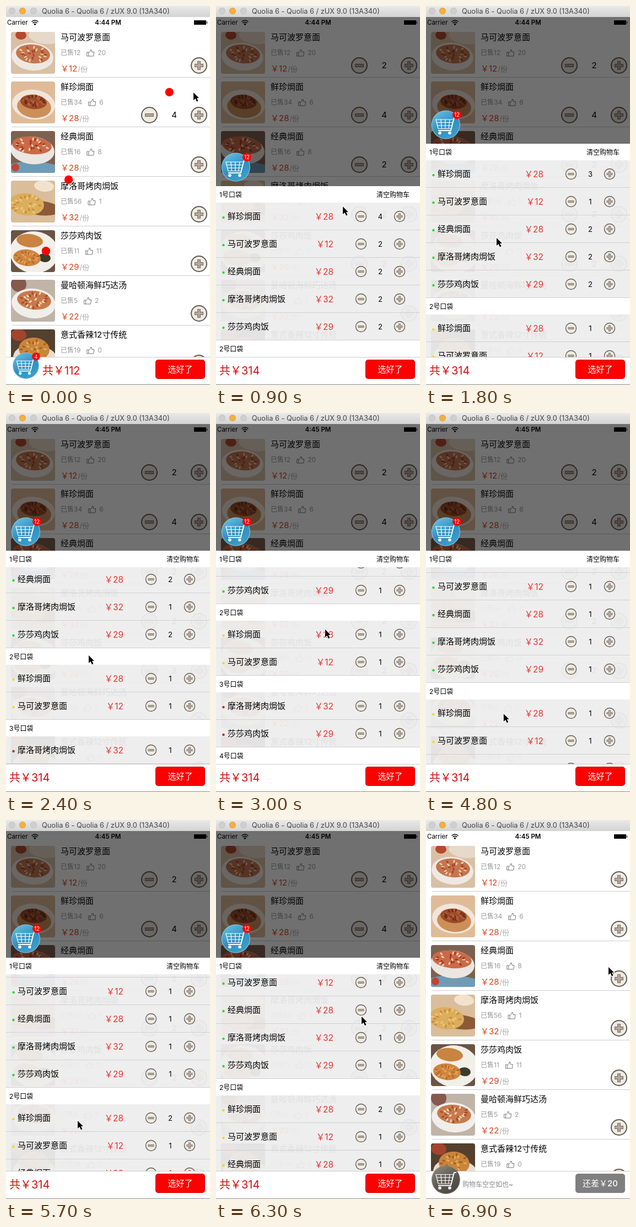
Recreate the animation shown at these times as an HTML page with a canvas. Size 370x688 px, loop 7200 ms.

```html
<!DOCTYPE html>
<html lang="zh-CN">
<head>
<meta charset="utf-8">
<title>购物车</title>
<style>
  html, body { margin: 0; width: 100%; height: 100%; overflow: hidden; background: #fff; }
  canvas { display: block; width: 370px; height: 688px; }
</style>
</head>
<body>
<canvas id="stage" width="370" height="688"></canvas>
<script>
const canvas = document.getElementById('stage');
const ctx = canvas.getContext('2d');
const FONT = 'Inter, "Noto Sans CJK SC", "Noto Sans CJK", sans-serif';
const STEP = 300, STEPS = 24, OPEN = 3, CLEARED = 23;
const BAR_TOP = 637, MAX_PANEL = 387;

// Photo shapes: [x, y, rx, ry, colour]; the last one is sprinkled with specks.
const dishes = [
  { name: '马可波罗意面', sold: 12, likes: 20, price: 12, back: '#d9bfa4', specks: ['#ecc9a4', '#a8482a'], shapes: [
    [18, 6, 10, 8, '#b5492f'], [62, 8, 30, 14, '#e6d9ca'], [39, 45, 38, 25, '#efe8e2'], [40, 40, 31, 17, '#c47650']] },
  { name: '鲜珍焗面', sold: 34, likes: 6, price: 28, back: '#e0bb98', specks: ['#b5623a', '#6e2d18'], shapes: [
    [41, 42, 39, 27, '#f1e5da'], [42, 46, 31, 20, '#cc8f58'], [41, 37, 24, 13, '#9c4a2a']] },
  { name: '经典焗面', sold: 16, likes: 8, price: 28, back: '#7d6150', specks: ['#f0d2a8', '#a83424'], shapes: [
    [50, 76, 60, 20, '#6f9cb5'], [8, 66, 7, 7, '#c04434'], [39, 35, 40, 25, '#ebe6e1'], [38, 26, 36, 16, '#c96a48']] },
  { name: '摩洛哥烤肉焗饭', sold: 56, likes: 1, price: 32, back: '#dabd9a', specks: ['#ecc780', '#c98c40'], shapes: [
    [60, 10, 18, 10, '#f0e3cd'], [54, 50, 36, 13, '#8c5a38'], [28, 43, 32, 20, '#dcae5c']] },
  { name: '莎莎鸡肉饭', sold: 11, likes: 11, price: 29, back: '#6a5444', specks: ['#e2a356', '#b8692a'], shapes: [
    [42, 40, 44, 38, '#f2eee8'], [34, 19, 24, 12, '#c88440'], [61, 50, 11, 8, '#3a3c2a'], [29, 50, 25, 15, '#cf853f']] },
  { name: '曼哈顿海鲜巧达汤', sold: 5, likes: 2, price: 22, back: '#c0b3a8', specks: ['#f0d5b0', '#a84a28'], shapes: [
    [14, 8, 14, 14, '#85594c'], [41, 43, 40, 27, '#f1eeea'], [42, 37, 31, 17, '#c77a4c']] },
  { name: '意式香辣12寸传统', sold: 19, likes: 0, price: 28, back: '#54402f', specks: ['#e6ab58', '#a85c20'], shapes: [
    [14, 10, 14, 11, '#a2452c'], [44, 52, 40, 24, '#e6ded0'], [42, 36, 28, 21, '#c8853c']] }
];

const pocketOrder = [1, 0, 2, 3, 4];
const ordered = [2, 4, 2, 2, 2, 0, 0];
const countsByStep = [[0, 4], [2, 4, 1], ordered];
// Portions carried out of the first pocket: [step, dish, pocket]
const moves = [[4, 1, 1], [5, 0, 1], [8, 3, 2], [9, 4, 2], [13, 2, 1], [17, 1, 1]];
const scrollByStep = [0, 0, 0, 0, 0, 0, 0, 53, 103, 183, 183, 183, 100, 35, 35, 35, 40, 44, 44, 44, 110, 60, 60, 0];
// Flying dots: [row, progress]
const dotsByStep = [[[1, .138], [1, .68], [1, .825]], [[2, .14], [0, .62], [0, .8]], [[4, .2], [4, .62], [3, .82]]];
const cursorKeys = [[0, 340, 157], [1, 342, 285], [2, 342, 460], [3, 230, 364], [6, 128, 421], [8, 150, 440],
  [10, 198, 393], [11, 190, 375], [14, 148, 546], [19, 130, 546], [22, 331, 262], [23, 331, 267]];

function text(str, x, y, size, color = '#000', align = 'left', weight = 400) {
  ctx.font = `${weight} ${size}px ${FONT}`;
  ctx.fillStyle = color;
  ctx.textAlign = align;
  ctx.fillText(str, x, y + size * .36);
  return x + ctx.measureText(str).width;
}
function rect(x, y, w, h, color) {
  ctx.fillStyle = color;
  ctx.fillRect(x, y, w, h);
}
function ellipse(x, y, rx, ry, color, tilt = 0) {
  ctx.beginPath();
  ctx.ellipse(x, y, rx, ry, tilt, 0, 7);
  ctx.fillStyle = color;
  ctx.fill();
}
const disc = (x, y, r, color) => ellipse(x, y, r, r, color);
function stroke(path, color, width) {
  ctx.strokeStyle = color;
  ctx.lineWidth = width;
  ctx.stroke(new Path2D(path));
}
function at(x, y, scale, draw) {
  ctx.save();
  ctx.translate(x, y);
  ctx.scale(scale, scale);
  draw();
  ctx.restore();
}
function clip(x, y, w, h, radius, draw) {
  ctx.save();
  ctx.beginPath();
  ctx.roundRect(x, y, w, h, radius);
  ctx.clip();
  draw();
  ctx.restore();
}
const noise = n => { const v = Math.sin(n * 127.1) * 43758.5; return v - Math.floor(v); };

function photo(dish, y) {
  at(9, y, 1, () => clip(0, 0, 80, 76, 4, () => {
    rect(0, 0, 80, 76, dish.back);
    dish.shapes.forEach(s => ellipse(...s, .1));
    const [x, cy, rx, ry] = dish.shapes[dish.shapes.length - 1];
    for (let i = 0; i < 26; i++) {
      const angle = i * 2.4, d = Math.sqrt(noise(i + dish.sold)) * .85;
      ellipse(x + Math.cos(angle) * rx * d, cy + Math.sin(angle) * ry * d, 3, 1.6, dish.specks[i % 2], angle);
    }
  }));
}

function roundButton(x, y, scale, plus) {
  at(x, y, scale, () => {
    disc(0, 0, 15, '#625b5a');
    disc(0, 0, 13, '#eeecdf');
    stroke(plus ? 'M-8 0H8M0-8V8' : 'M-8 0H8', '#7d7070', 6);
    stroke(plus ? 'M-7 0H7M0-7V7' : 'M-7 0H7', '#b9aaa4', 3.4);
  });
}

function listRow(dish, i, count) {
  const y = 40 + i * 90;
  photo(dish, y + 7);
  text(dish.name, 99, y + 17, 15);
  const x = text('已售' + dish.sold, 99, y + 45, 12, '#999') + 11;
  at(x, y + 39, 1, () => stroke('M.5 5H3.5V12H.5ZM3.5 6 7 3V.5H9L9.5 4.5H13.5L12.5 12H3.5', '#777', 1));
  text(dish.likes, x + 20, y + 45, 12, '#999');
  const end = text('￥' + dish.price, 99, y + 74, 15, '#d8431c');
  text('/份', end + 1, y + 74, 13, '#aaa');
  rect(11, y + 89, 359, 1, '#ccc');
  roundButton(350, y + 68, 1, true);
  if (count) {
    roundButton(260, y + 68, 1, false);
    text(count, 305, y + 68, 15, '#000', 'center');
  }
}

function statusBar(time) {
  text('Carrier', 2, 30, 11.5);
  stroke('M46.5 28.5Q52.5 23.5 58.5 28.5M48.5 31Q52.5 27.5 56.5 31', '#000', 1.6);
  disc(52.5, 33.2, 1.6, '#000');
  text(time, 185, 30, 11.5, '#000', 'center', 600);
  rect(341, 26, 22, 8, '#000');
  rect(364, 28, 1, 4, '#000');
}

function titleBar() {
  const shade = ctx.createLinearGradient(0, 0, 0, 20);
  shade.addColorStop(0, '#e9e9e9');
  shade.addColorStop(1, '#d3d3d3');
  rect(0, 0, 370, 20, shade);
  [[11, '#cfcfcf', '#bdbdbd'], [30, '#f3b03e', '#dc9a30'], [50, '#cfcfcf', '#bdbdbd']].forEach(([x, fill, rim]) => {
    disc(x, 9, 6, rim);
    disc(x, 9, 5.3, fill);
  });
  text('Quolia 6 - Quolia 6 / zUX 9.0 (13A340)', 65, 9.5, 12.8, '#444');
}

function cart(x, y, scale, badge) {
  at(x, y, scale, () => {
    const shade = ctx.createLinearGradient(-14, -22, 14, 24);
    shade.addColorStop(0, badge ? '#5fb8dd' : '#85827a');
    shade.addColorStop(.5, badge ? '#2f8fc0' : '#5c5952');
    shade.addColorStop(1, badge ? '#3fa0cc' : '#4a4740');
    disc(0, 0, 26, badge ? '#8fc3da' : '#8d8a84');
    disc(0, 0, 25, shade);
    stroke('M-18-9.500H14L10 7H-14ZM-17-4H13M-15.500 1.500H11.500M-9-9.500-7.500 7M-1-9.500V7M7-9.500 5 7', '#fff', 1.2);
    stroke('M19-13H15L9 10.500H-14', '#fff', 1.8);
    disc(-11, 15, 2.8, '#fff');
    disc(7, 15, 2.8, '#fff');
    if (badge) {
      disc(20, -18, 7.8, '#f00');
      text(badge, 20, -18, 10, '#fff', 'center');
    }
  });
}

function pocketsAt(step) {
  const pockets = [new Map(pocketOrder.map(d => [d, ordered[d]])), new Map(), new Map()];
  for (const [when, dish, to] of moves) {
    if (when > step) continue;
    pockets[0].set(dish, pockets[0].get(dish) - 1);
    pockets[to].set(dish, (pockets[to].get(dish) || 0) + 1);
  }
  return [...pockets.filter(p => p.size), new Map()];
}

function pocketHeader(i, y) {
  rect(0, y, 370, 30, '#fff');
  text(`${i + 1}号口袋`, 6, y + 15.5, 12);
}

function pocketRow(dish, count, y, color) {
  rect(0, y, 370, 50, 'rgba(255,255,255,.88)');
  rect(0, y + 49, 370, 1, '#d3ced5');
  disc(13.5, y + 27, 2.2, color);
  text(dish.name, 21, y + 25, 15);
  text('￥' + dish.price, 213, y + 25, 15.5, '#e5352f', 'right');
  roundButton(263, y + 25, .68, false);
  text(count, 298, y + 25, 13, '#000', 'center');
  roundButton(333, y + 25, .68, true);
}

function panel(step) {
  const pockets = pocketsAt(step);
  const content = pockets.reduce((sum, p) => sum + 30 + p.size * 50, 0);
  const height = Math.min(MAX_PANEL, content), top = BAR_TOP - height;
  rect(0, 20, 370, BAR_TOP - 20, 'rgba(0,0,0,.56)');
  clip(0, top + 30, 370, height - 30, 0, () => {
    let y = top - scrollByStep[step];
    pockets.forEach((pocket, i) => {
      pocketHeader(i, y);
      y += 30;
      for (const [dish, count] of pocket) {
        pocketRow(dishes[dish], count, y, ['#1de01d', '#f7d800', '#e01010'][i]);
        y += 50;
      }
    });
  });
  pocketHeader(0, top);
  text('清空购物车', 351, top + 15.5, 12, '#000', 'right');
  return top;
}

function bottomBar(total, open) {
  rect(0, BAR_TOP, 370, 51, '#fff');
  rect(0, BAR_TOP, 370, 1, '#ccc');
  if (total) text('共￥' + total, open ? 6 : 66, 662, 20, '#d40d0d');
  else text('购物车空空如也~', 66, 662, 12, '#888');
  ctx.beginPath();
  ctx.roundRect(271, 642, 90, 35, 5);
  ctx.fillStyle = total ? '#c80000' : '#7f7f7f';
  ctx.fill();
  if (total) {
    ctx.beginPath();
    ctx.roundRect(272, 643, 88, 33, 4);
    ctx.fillStyle = '#fe0000';
    ctx.fill();
  }
  text(total ? '选好了' : '还差￥20', 316, 660, 15, '#fff', 'center', 500);
  rect(0, 687, 370, 1, '#888');
}

function flyingDot([row, p]) {
  const y = 108 + row * 90, q = 1 - p;
  disc(q * q * 350 + 2 * p * q * 150 + p * p * 27, q * q * y + 2 * p * q * (y - 211) + p * p * 650, 7.7, '#f00');
}

function cursor(step) {
  const next = cursorKeys.findIndex(k => k[0] >= step);
  const b = cursorKeys[next], a = cursorKeys[Math.max(0, next - 1)];
  const f = b[0] === a[0] ? 1 : (step - a[0]) / (b[0] - a[0]);
  at(a[1] + (b[1] - a[1]) * f, a[2] + (b[2] - a[2]) * f, 1, () => {
    const arrow = 'M0 0V14L3.500 11 6 16.500 8.500 15.300 6 10H10Z';
    stroke(arrow, '#fff', 2);
    ctx.fillStyle = '#000';
    ctx.fill(new Path2D(arrow));
  });
}

function draw(step) {
  const open = step >= OPEN && step < CLEARED;
  const counts = step === CLEARED ? [] : countsByStep[step] || ordered;
  const badge = counts.reduce((a, b) => a + b, 0);
  const total = counts.reduce((sum, n, i) => sum + n * dishes[i].price, 0);
  rect(0, 0, 370, 688, '#fff');
  dishes.forEach((dish, i) => listRow(dish, i, counts[i]));
  statusBar(step < 8 ? '4:44 PM' : '4:45 PM');
  titleBar();
  const top = open ? panel(step) : 0;
  bottomBar(total, open);
  if (open) cart(36, top - 34.5, 1, badge);
  else cart(36, 653, badge ? .92 : 1, badge);
  (dotsByStep[step] || []).forEach(flyingDot);
  cursor(step);
}

function tick() {
  draw(Math.floor(performance.now() / STEP) % STEPS);
  requestAnimationFrame(tick);
}
tick();
</script>
</body>
</html>
```
